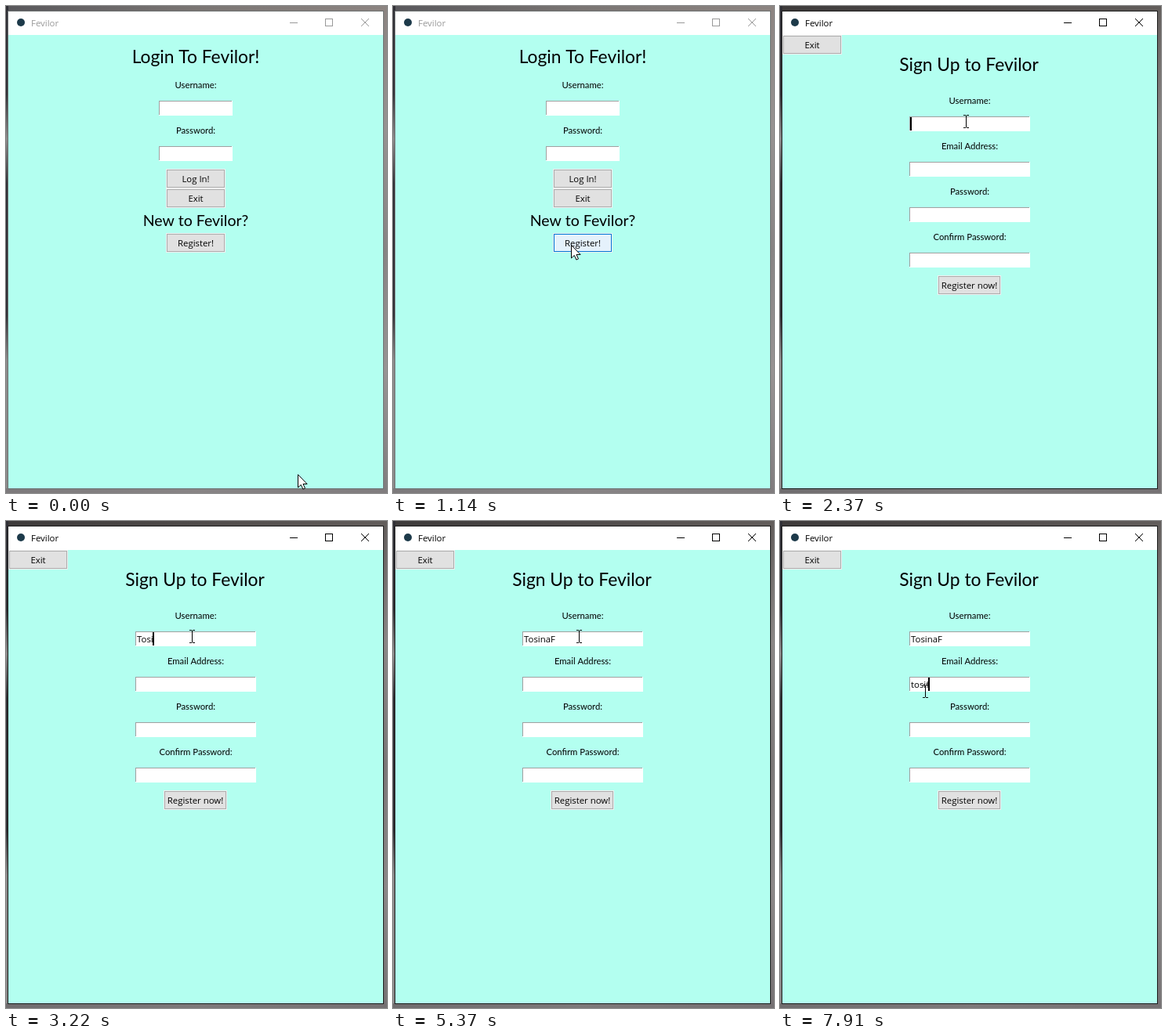
These frames come from a looping animation (486x622 px, 7.99 s). An HTML page with a canvas:

```html
<!DOCTYPE html>
<html lang="en">
<head>
<meta charset="utf-8">
<title>Fevilor</title>
<style>
html, body { margin: 0; width: 100%; height: 100%; overflow: hidden; }
canvas { display: block; width: 486px; height: 622px; }
</style>
</head>
<body>
<canvas id="stage" width="486" height="622"></canvas>
<script>
const ctx = document.getElementById('stage').getContext('2d');
const LOOP = 7990;
const UI = '11.4px "Open Sans", "Noto Sans", sans-serif';
const lato = size => `${size}px Lato, sans-serif`;
const LABEL = lato(11.3);

const PRESS = 1260, SIGNUP = 1400, FOCUS_NAME = 2000, FOCUS_MAIL = 6450;
const USER = { text: 'TosinaF', keys: [2820, 2960, 3060, 3200, 3400, 3900, 4450] };
const MAIL = { text: 'tosif', keys: [7120, 7260, 7420, 7600, 7800] };

// Pointer path: time, x, y
const PATH = [
  [150, 372, 598], [270, 320, 591], [350, 300, 548], [450, 246, 441],
  [570, 203, 337], [690, 216, 319], [850, 227, 305], [1430, 227, 305],
  [1900, 237, 147], [5560, 237, 147], [6330, 185, 217]
];

function rect(x, y, w, h, fill) {
  ctx.fillStyle = fill;
  ctx.fillRect(x, y, w, h);
}

function frame(x, y, w, h, color) {
  ctx.strokeStyle = color;
  ctx.lineWidth = 1;
  ctx.strokeRect(x + 0.5, y + 0.5, w - 1, h - 1);
}

function text(str, x, y, font, align = 'center', color = '#000') {
  ctx.font = font;
  ctx.textAlign = align;
  ctx.fillStyle = color;
  ctx.fillText(str, x, y);
}

function strip(x, y, w, h, colors, vertical) {
  const g = vertical ? ctx.createLinearGradient(0, 0, 0, 622) : ctx.createLinearGradient(0, 0, 486, 0);
  colors.forEach((c, i) => g.addColorStop(i / (colors.length - 1), c));
  rect(x, y, w, h, g);
}

function button(label, x, y, w, state) {
  const fill = { hover: '#e5f1fb', down: '#cce4f7' }[state] || '#e1e1e1';
  rect(x - 1, y - 1, w + 2, 25, '#f0f0f0');
  rect(x, y, w, 23, fill);
  frame(x, y, w, 23, state ? '#0078d7' : '#adadad');
  text(label, x + w / 2, y + 16, UI);
}

function entry(x, y, w) {
  rect(x, y, w, 19, '#fff');
  rect(x, y, w - 1, 1, '#a0a0a0');
  rect(x, y, 1, 18, '#a0a0a0');
}

function typed(field, t, y, focused, since) {
  const str = field.text.slice(0, field.keys.filter(k => k <= t).length);
  text(str, 167, y + 14, UI, 'left');
  if (focused && (t - since) % 900 < 600) {
    const x = str ? 166 + Math.round(ctx.measureText(str).width) : 166;
    rect(x, y + 1, 2, 17, '#000');
  }
}

function pointerAt(t) {
  const i = PATH.findIndex(p => t < p[0]);
  if (i === 0) return PATH[0].slice(1);
  if (i < 0) return PATH[PATH.length - 1].slice(1);
  const [t0, x0, y0] = PATH[i - 1], [t1, x1, y1] = PATH[i];
  const p = (t - t0) / (t1 - t0);
  return [Math.round(x0 + (x1 - x0) * p), Math.round(y0 + (y1 - y0) * p)];
}

function arrow(x, y) {
  const pts = [[0, 0], [0, 16.5], [3.8, 13], [6.4, 18.6], [9, 17.4], [6.5, 12], [11.6, 12]];
  ctx.beginPath();
  pts.forEach(([dx, dy]) => ctx.lineTo(x + 0.5 + dx, y + 0.5 + dy));
  ctx.closePath();
  ctx.fillStyle = '#fff';
  ctx.fill();
  ctx.strokeStyle = '#000';
  ctx.lineWidth = 1;
  ctx.stroke();
}

function beam(x, y) {
  rect(x, y - 7, 1, 15, '#000');
  for (const dy of [-8, 8]) {
    rect(x - 3, y + dy, 3, 1, '#000');
    rect(x + 1, y + dy, 3, 1, '#000');
  }
}

function desktop(active) {
  const dark = '#303036', grey = '#8c8a8b';
  strip(0, 0, 486, 7, active ? ['#3d3a3a', '#4f4b4a', '#625d5b'] : ['#58575b', '#7a7573', '#8c8481']);
  strip(0, 0, 3, 622, [dark, dark, dark, grey, dark, dark, dark, dark, grey, grey, grey, grey], true);
  strip(481, 0, 5, 622, active ? ['#625d5b', '#8b8786', '#7c7878', '#8c8888', '#767274'] : ['#8c8481', '#979392', '#888484', '#989494', '#807c7e'], true);
  strip(0, 616, 486, 6, active ? ['#6f6c6e', '#7d797a', '#757173'] : ['#7c797b', '#888485', '#807c7e']);
}

function chrome(active) {
  const ink = active ? '#000' : '#999';
  rect(3, 7, 478, 30, '#fff');
  rect(3, 37, 478, 579, '#b3fff0');
  frame(2, 6, 480, 611, active ? '#1c1c1c' : '#6e7272');
  ctx.beginPath();
  ctx.arc(19, 21, 5, 0, 7);
  ctx.fillStyle = '#1d3a4a';
  ctx.fill();
  text('Fevilor', 32, 26, UI, 'left', ink);
  rect(362, 21, 10, 1, ink);
  frame(407, 16, 10, 10, ink);
  ctx.beginPath();
  ctx.moveTo(453, 16);
  ctx.lineTo(463, 26);
  ctx.moveTo(463, 16);
  ctx.lineTo(453, 26);
  ctx.stroke();
}

function login(t, [x, y]) {
  text('Login To Fevilor!', 242, 73, lato(22.8));
  text('Username:', 242, 105, LABEL);
  entry(195, 121, 94);
  text('Password:', 242, 163, LABEL);
  entry(195, 179, 94);
  const over = top => x >= 205 && x < 279 && y >= top && y < top + 23;
  button('Log In!', 205, 209, 74, over(209) && 'hover');
  button('Exit', 205, 234, 74, over(234) && 'hover');
  text('New to Fevilor?', 242, 281, lato(19.5));
  button('Register!', 205, 291, 74, over(291) && (t >= PRESS ? 'down' : 'hover'));
}

function signup(t) {
  button('Exit', 4, 38, 74);
  text('Sign Up to Fevilor', 241, 83, lato(22.8));
  ['Username:', 'Email Address:', 'Password:', 'Confirm Password:'].forEach((label, i) => {
    text(label, 242, 125 + 58 * i, LABEL);
    entry(165, 141 + 58 * i, 154);
  });
  button('Register now!', 202, 345, 79);
  typed(USER, t, 141, t >= FOCUS_NAME && t < FOCUS_MAIL, FOCUS_NAME);
  typed(MAIL, t, 199, t >= FOCUS_MAIL, FOCUS_MAIL);
}

function draw(t) {
  const active = t >= PRESS, pos = pointerAt(t), [x, y] = pos;
  desktop(active);
  chrome(active);
  if (t < SIGNUP) login(t, pos);
  else signup(t);
  const inEntry = t >= SIGNUP && x >= 165 && x < 319 && y >= 141 && y < 334 && (y - 141) % 58 < 19;
  (inEntry ? beam : arrow)(x, y);
}

const start = performance.now();
function tick() {
  draw((performance.now() - start) % LOOP);
  requestAnimationFrame(tick);
}
tick();
</script>
</body>
</html>
```
